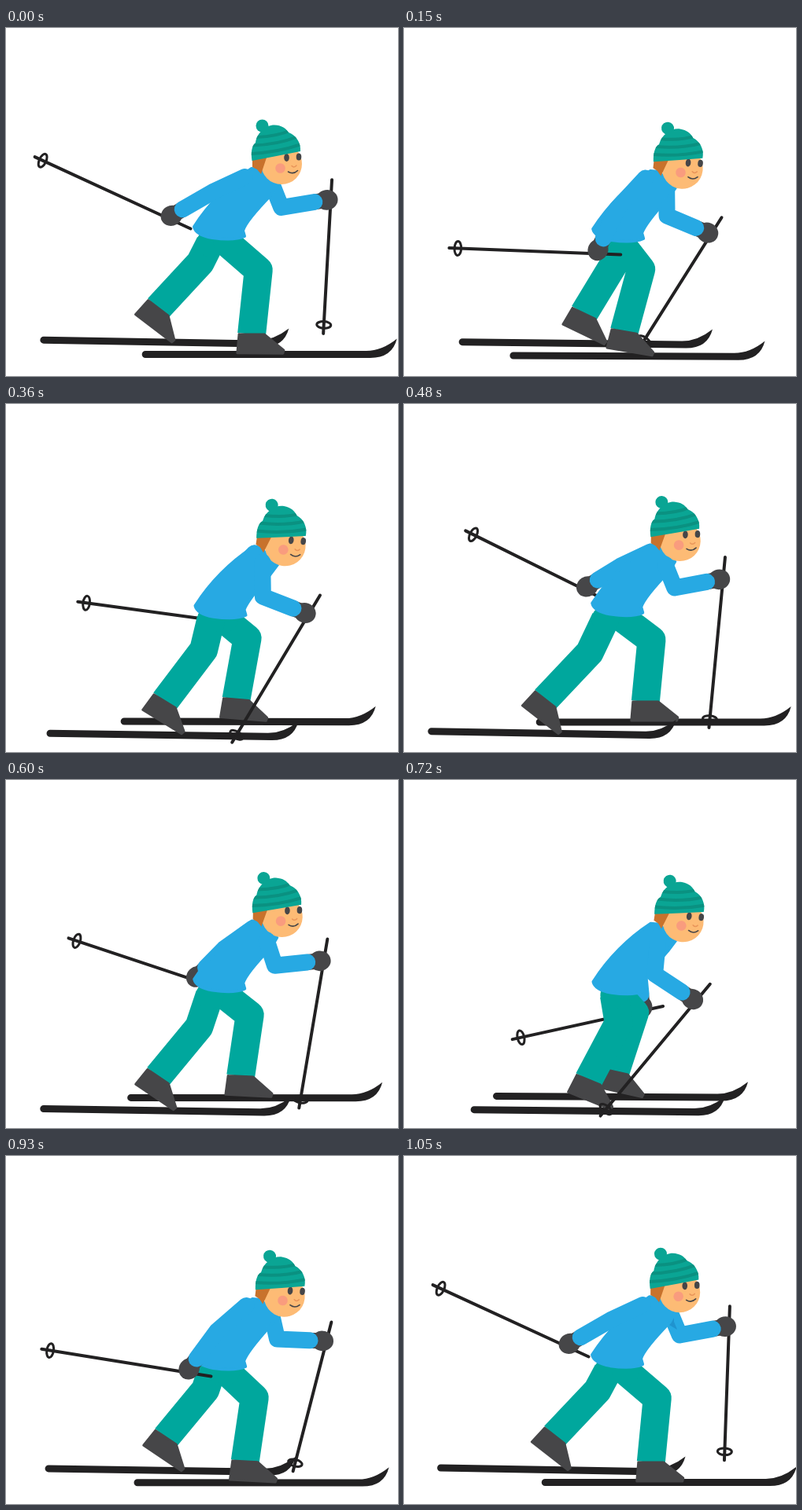
Animation of 498 by 443 pixels, one loop 1080 ms. Source, as an HTML page with a canvas:

```html
<!DOCTYPE html>
<html lang="en">
<head>
<meta charset="utf-8">
<title>Cross-country skier</title>
<style>
html, body { margin: 0; width: 100%; height: 100%; overflow: hidden; background: #fff; }
canvas { display: block; }
</style>
</head>
<body>
<canvas id="stage" width="498" height="443"></canvas>
<script>
const ctx = document.getElementById('stage').getContext('2d');
const LOOP = 1080, STEP = 30;
const C = {
  shirt: '#27a9e3', shade: '#1f93cf', pants: '#00a79d', dark: '#464648', ink: '#222122',
  hat: '#0aa594', stripe: '#0a9181', skin: '#fdbb75', hair: '#c8722c', cheek: '#f99c7e'
};

const rad = d => d * Math.PI / 180;

// Swings between 0 and 1, reaching 1 at the given peak time
const swing = (t, peak) => (1 + Math.cos(2 * Math.PI * (t - peak) / LOOP)) / 2;

function line(color, width, points, cap = 'round') {
  ctx.strokeStyle = color;
  ctx.lineWidth = width;
  ctx.lineCap = cap;
  ctx.lineJoin = 'round';
  ctx.beginPath();
  points.forEach(p => ctx.lineTo(...p));
  ctx.stroke();
}

function poly(color, points) {
  ctx.fillStyle = color;
  ctx.beginPath();
  points.forEach(p => ctx.lineTo(...p));
  ctx.fill();
}

function oval(color, x, y, rx, ry = rx, turn = 0) {
  ctx.fillStyle = color;
  ctx.beginPath();
  ctx.ellipse(x, y, rx, ry, turn, 0, 7);
  ctx.fill();
}

function arc(color, width, x0, y0, cx, cy, x1, y1) {
  ctx.strokeStyle = color;
  ctx.lineWidth = width;
  ctx.lineCap = 'round';
  ctx.beginPath();
  ctx.moveTo(x0, y0);
  ctx.quadraticCurveTo(cx, cy, x1, y1);
  ctx.stroke();
}

function at(x, y, angle, draw) {
  ctx.save();
  ctx.translate(x, y);
  ctx.rotate(rad(angle));
  draw();
  ctx.restore();
}

// Legs: s is 0 with the foot in front, 1 with the foot behind
const legSwing = c => c - .17 * c * (1 - c);

function ski(x, y, s) {
  const tip = 324 - 9 * s ** 4;
  at(x, y, s, () => {
    ctx.fillStyle = C.ink;
    ctx.beginPath();
    ctx.arc(4.5, 0, 4.5, Math.PI / 2, -Math.PI / 2);
    ctx.lineTo(tip - 39, -4.5);
    ctx.quadraticCurveTo(tip - 19, -4.5, tip, -20);
    ctx.quadraticCurveTo(tip - 6, 4.5, tip - 34, 4.5);
    ctx.fill();
  });
}

function leg(ax, ay, shin, s) {
  const foot = 38 * s, lean = rad(foot + 5.5);
  const knee = [ax + shin * Math.sin(lean), ay - shin * Math.cos(lean)];
  const hip = [270 + (knee[0] - 283) * .3, 274];
  line(C.pants, 36, [hip, knee, [ax, ay]], 'butt');
  oval(C.pants, ...hip, 17.5);
  at(ax, ay, foot, () => {
    const boot = [[-16, 0], [16, 0], [41, 20], [40, 24], [-18, 24], [-16, 0]];
    poly(C.dark, boot);
    line(C.dark, 3, boot);
  });
}

// Arms: a is 0 with the hand behind, 1 with the hand in front
function arm(x, y, { reach, upper, lift }, a) {
  const polar = (r, deg) => [x + r * Math.sin(rad(deg)), y + r * Math.cos(rad(deg))];
  const turn = -69 + 147 * a + lift * a * (1 - a);
  const hand = polar(reach, turn);
  const elbow = polar(upper, turn - 11 - 20 * a);
  const dir = Math.atan2(hand[1] - elbow[1], hand[0] - elbow[0]);
  const wrist = [hand[0] - 16 * Math.cos(dir), hand[1] - 16 * Math.sin(dir)];
  const dx = elbow[0] - x;
  const shoulder = [x + 10 + .35 * dx, y - 2 + .18 * dx];
  return { hand, elbow, wrist, shoulder, dir };
}

function pole([x, y], angle, grip, length) {
  at(x, y, angle, () => {
    line(C.ink, 4, [[2 - grip, -5], [length - 2, -5]]);
    ctx.lineWidth = 3;
    ctx.beginPath();
    ctx.ellipse(length - 13, -5, 4.3, 9, 0, 0, 7);
    ctx.stroke();
  });
}

function drawArm({ hand, elbow, wrist, shoulder, dir }) {
  line(C.dark, 20, [wrist, hand], 'butt');
  oval(C.dark, ...hand, 14, 12.8, dir);
  line(C.shirt, 21, [shoulder, elbow, wrist]);
}

// k is 0 when stretched out, 1 when upright
function torso(k) {
  ctx.save();
  ctx.translate(2 * k, 5 * k);
  ctx.beginPath();
  ctx.moveTo(312, 179);
  ctx.lineTo(322, 180);
  ctx.lineTo(344, 200);
  ctx.lineTo(338 - 6 * k, 211 + 4 * k);
  ctx.quadraticCurveTo(304 + 2 * k, 246, 301, 258);
  ctx.lineTo(303, 265);
  ctx.quadraticCurveTo(290, 271, 262, 267);
  ctx.quadraticCurveTo(241, 263, 239, 253);
  ctx.quadraticCurveTo(268, 208, 312, 179);
  ctx.closePath();
  ctx.fillStyle = ctx.strokeStyle = C.shirt;
  ctx.lineWidth = 4;
  ctx.lineJoin = 'round';
  ctx.fill();
  ctx.stroke();
  ctx.restore();
}

function head(k) {
  ctx.save();
  ctx.translate(335 + 3 * k, 190 + 6.5 * k);
  ctx.rotate(rad(11.5 * k));
  ctx.translate(-335, -190);

  oval(C.skin, 350, 173, 26);
  poly(C.hair, [[313, 164], [332, 162], [328, 174], [324, 186], [319, 180], [313, 177]]);
  oval(C.cheek, 348.5, 178.5, 6.3);
  oval(C.dark, 356.5, 165, 3.3, 5);
  oval(C.dark, 372, 164, 3.3, 4.6);
  arc('#e8955a', 1.5, 363, 175.5, 366, 178.5, 369, 175);
  arc(C.dark, 1.6, 358.5, 183, 365, 187, 370.5, 181.5);

  oval(C.hat, 325.5, 124.5, 8);
  ctx.fillStyle = C.hat;
  ctx.beginPath();
  ctx.moveTo(312.5, 169);
  ctx.bezierCurveTo(311, 158, 312, 150, 317, 146);
  ctx.bezierCurveTo(319, 133, 330, 123.5, 341, 123.5);
  ctx.bezierCurveTo(350, 124, 355, 127, 359, 133);
  ctx.bezierCurveTo(368, 136, 375, 146, 374, 157);
  ctx.quadraticCurveTo(344, 163, 312.5, 169);
  ctx.fill();
  ctx.clip();
  for (let i = 0; i < 3; i++) {
    const y = 160 - 10.5 * i;
    arc(C.stripe, 4, 308 + 5 * i, y, 345, y - 1, 378 - 8 * i, y - 13 + 2 * i);
  }
  ctx.restore();
}

function draw(t) {
  const k = (1 - Math.cos(4 * Math.PI * t / LOOP)) / 2;
  const stride = swing(t, 495);
  const near = legSwing(stride), far = legSwing(1 - stride);
  const a = swing(t, 525), b = 1 - swing(t, 505);
  const nearArm = arm(310, 200, { reach: 107 - 14 * a, upper: 48, lift: 0 }, a);
  const farArm = arm(318, 198, { reach: 92, upper: 44, lift: 40 }, b);

  ctx.fillStyle = '#fff';
  ctx.fillRect(0, 0, 498, 443);

  ski(168 - 126 * far - 60 * far * (1 - far), 405 - 8 * far, far);
  pole(farArm.hand, 207 - 115 * b, 28, 172);
  drawArm(farArm);
  if (farArm.elbow[0] > 350) poly(C.shade, [[336, 204], [343, 202], [343, 211], [347, 221], [337, 215]]);
  leg(307 - 116 * far, 379 - 23 * far, 79, far);

  ski(175 - 145 * near - 20 * near * (1 - near), 415.5 + near + 25 * near ** 2 * (1 - near), near);
  leg(314 - 135 * near, 390 - 14 * near, 82, near);
  torso(k);
  head(k);
  pole(nearArm.hand, 205 - 112 * a + 30 * a * a * (1 - a), 31, 191);
  drawArm(nearArm);
}

const start = performance.now();
function tick() {
  const t = (performance.now() - start) % LOOP;
  draw(Math.floor(t / STEP) * STEP);
  requestAnimationFrame(tick);
}
tick();
</script>
</body>
</html>
```
